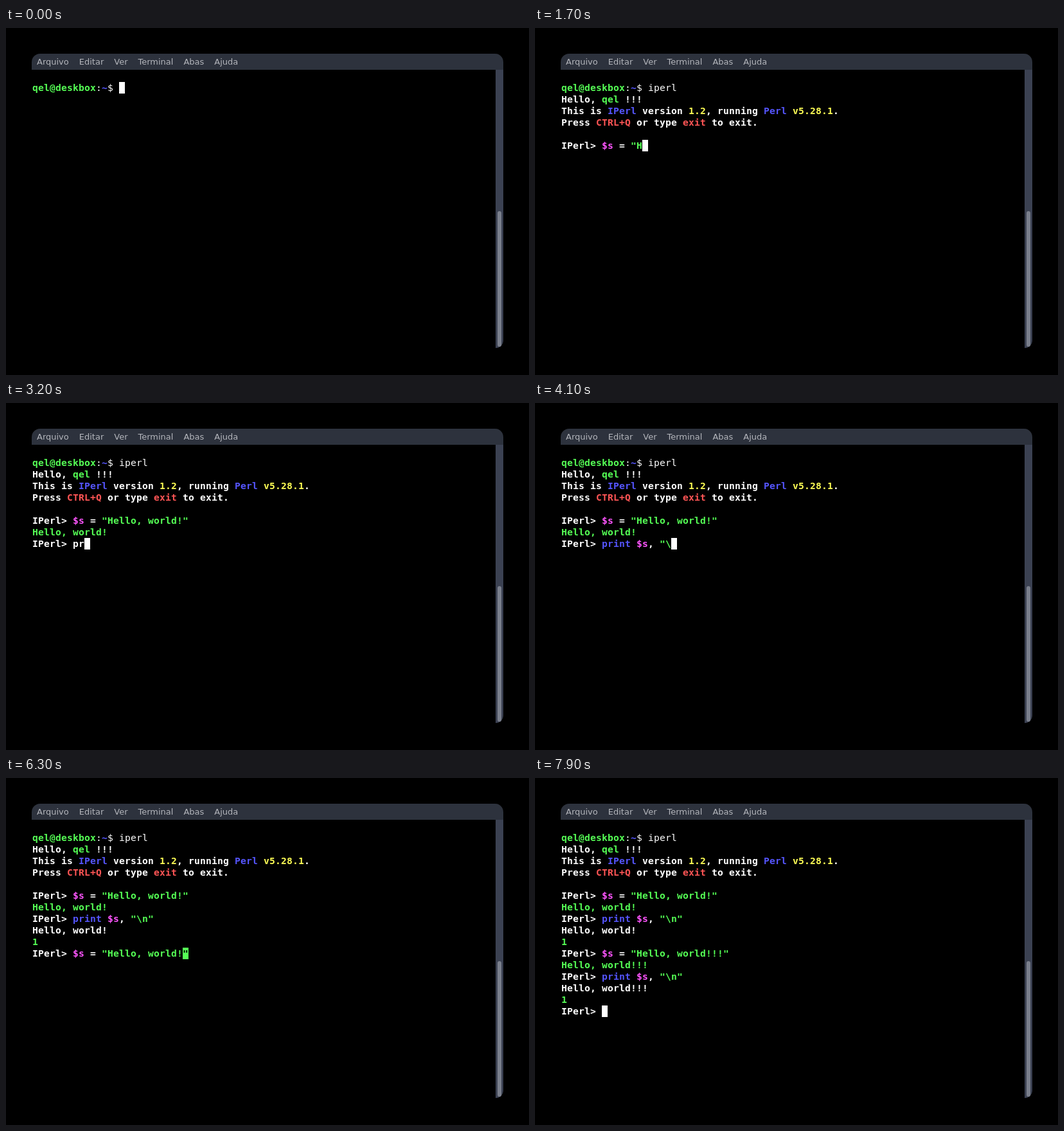
Write an HTML page that moves like this. It is 814x540 px and loops after 8000 ms.

```html
<!DOCTYPE html>
<html lang="pt">
<head>
<meta charset="utf-8">
<title>IPerl</title>
<style>
  html, body { margin: 0; width: 100%; height: 100%; overflow: hidden; background: #000; }
  #bar {
    position: absolute; left: 40px; top: 40px; width: 734px; height: 25px;
    box-sizing: border-box; padding-left: 8px; display: flex; gap: 16px;
    border-radius: 13px 13px 0 0; background: #2d323d; color: #b4b6bc;
    font: 13px/25px "DejaVu Sans", sans-serif;
  }
  #track {
    position: absolute; left: 762px; top: 65px; width: 12px; height: 433px;
    border-radius: 0 0 12px 0; background: #3b4152;
  }
  #thumb {
    position: absolute; left: 3px; top: 220px; width: 6px; height: 211px;
    border-radius: 3px; background: #7a7f8c;
  }
  #term {
    position: absolute; left: 41px; top: 84px; color: #fff;
    font: bold 14.667px/18px "DejaVu Sans Mono", monospace;
    letter-spacing: calc(9px - 1ch);
  }
  #term div { height: 18px; white-space: pre; }
  .n { font-weight: normal; }
  .g { color: #5f5; }
  .b { color: #55f; }
  .y { color: #ff5; }
  .r { color: #f55; }
  .p { color: #f5f; }
  .cur { display: inline-block; width: 9px; height: 18px; vertical-align: top; background: #fff; color: #000; }
  .cur.on { background: #5f5; }
</style>
</head>
<body>
<div id="bar">
  <span>Arquivo</span><span>Editar</span><span>Ver</span>
  <span>Terminal</span><span>Abas</span><span>Ajuda</span>
</div>
<div id="track"><div id="thumb"></div></div>
<div id="term"></div>
<script>
const LOOP = 8000, TICK = 100;
const USER = 'qel', HOST = 'deskbox';
const tag = (cls, text) => `<span class="${cls}">${text}</span>`;

const shell = tag('g', `${USER}@${HOST}`) + tag('n', ':') + tag('b', '~') + tag('n', '$ ');
const prompt = 'IPerl&gt; ';
const paint = src => src.replace(/"[^"]*"?|\$\w*|\bprint\b/g,
  m => tag(m[0] === '"' ? 'g' : m[0] === '$' ? 'p' : 'b', m));

const greet = marks => 'Hello, world' + '!'.repeat(marks);
const assign = marks => `$s = "${greet(marks)}"`;
const show = 'print $s, "\\n"';

// Everything one assign-and-print round leaves on screen
const round = marks => [
  prompt + paint(assign(marks)),
  tag('g', greet(marks)),
  prompt + paint(show),
  greet(marks),
  tag('g', '1')
];

const log = [
  shell + tag('n', 'iperl'),
  `Hello, ${tag('g', USER)} !!!`,
  `This is ${tag('b', 'IPerl')} version ${tag('y', '1.2')}, running ${tag('b', 'Perl')} ${tag('y', 'v5.28.1')}.`,
  `Press ${tag('r', 'CTRL+Q')} or type ${tag('r', 'exit')} to exit.`,
  '',
  ...round(1),
  ...round(3)
];

const steps = [];

// Shows the first `rows` log lines, then the input with the cursor `back` cells from its end
function add(time, rows, text = '', back = 0) {
  steps.push({ time, rows, text, col: text.length - back });
}

// Types an even burst, growing the input from one length to another
function type(rows, text, from, to, start, end) {
  for (let t = start; t <= end; t += TICK) {
    const n = Math.round(from + (to - from) * (t - start) / (end - start));
    add(t, rows, text.slice(0, n));
  }
}

add(0, 0);
type(0, 'iperl', 1, 5, 100, 500);
add(600, 5);
type(5, assign(1), 1, 5, 800, 1400);
type(5, assign(1), 6, 17, 1600, 2400);
type(5, assign(1), 18, 20, 2500, 2900);
add(3000, 7);
type(7, show, 2, 6, 3200, 3500);
type(7, show, 7, 14, 3700, 4300);
add(4500, 10);
add(4800, 10, show);
add(5100, 10, assign(1));
add(5600, 10, assign(1), 1);
add(6400, 10, assign(2), 1);
add(6500, 10, assign(3), 1);
add(6700, 12);
add(6900, 12, show);
add(7500, 15);

const term = document.getElementById('term');
let last = null;

function draw({ rows, text, col }) {
  const color = rows ? paint : s => tag('n', s);
  const under = text[col];
  const cursor = tag(under ? 'cur on' : 'cur', under || ' ');
  const line = (rows ? prompt : shell) + color(text.slice(0, col)) + cursor;
  term.innerHTML = [...log.slice(0, rows), line].map(row => `<div>${row}</div>`).join('');
}

function tick() {
  const t = performance.now() % LOOP;
  const step = steps.findLast(s => s.time <= t);
  if (step !== last) draw(last = step);
  requestAnimationFrame(tick);
}
tick();
</script>
</body>
</html>
```
